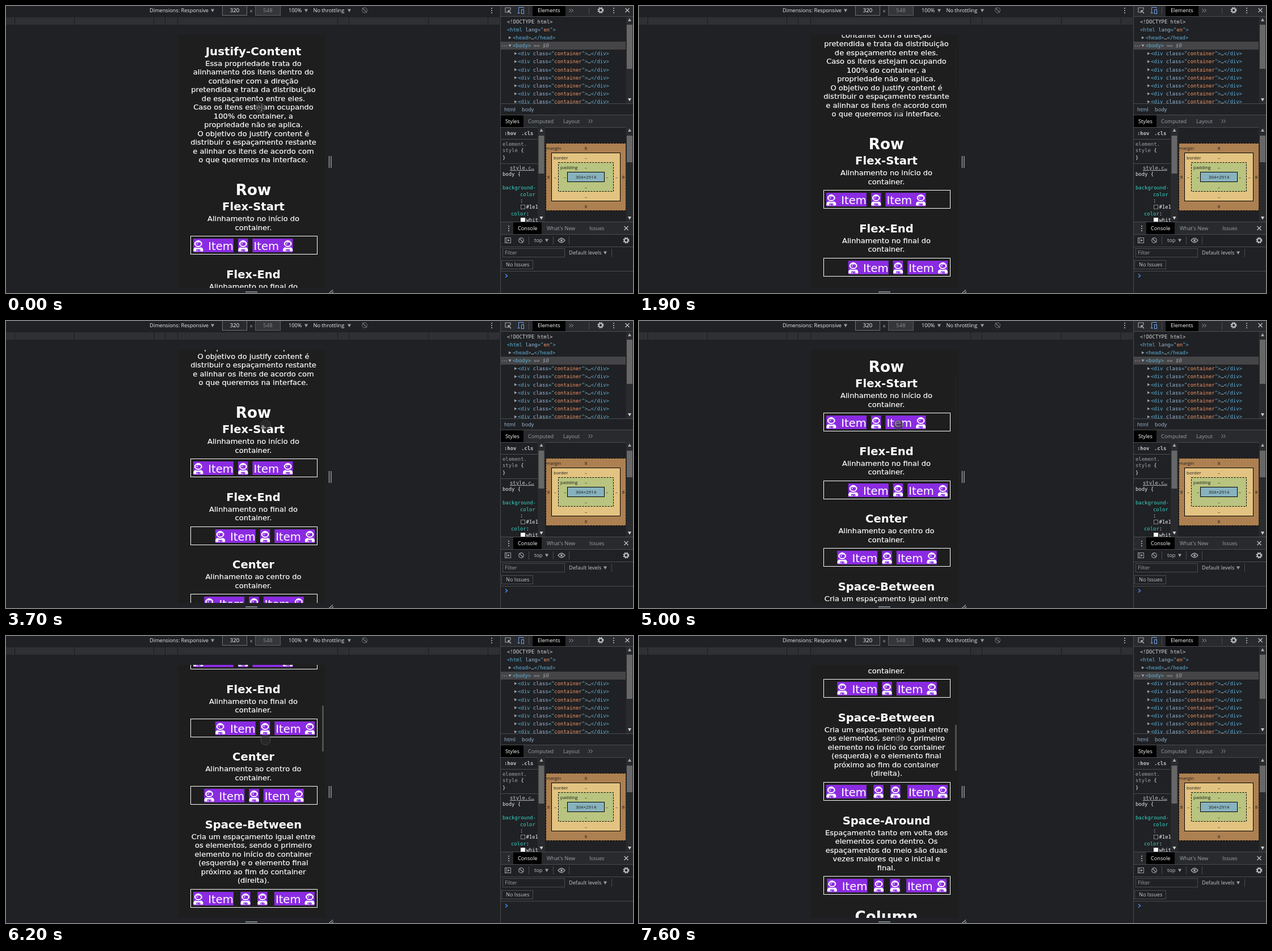
An HTML page that plays this animation: 1105x507 px, repeating every 8000 ms.

```html
<!DOCTYPE html>
<html lang="pt">
<head>
<meta charset="utf-8">
<title>Justify-Content</title>
<style>
  html, body { margin: 0; width: 100%; height: 100%; overflow: hidden; background: #202124; }
  svg { display: block; }
  .page { font-family: "DejaVu Sans", sans-serif; }
  .ui { font-family: "Open Sans", sans-serif; }
  .mono { font-family: "DejaVu Sans Mono", monospace; }
</style>
</head>
<body>
<svg id="stage" width="1105" height="507" viewBox="0 0 1105 507"></svg>
<script>
const LOOP = 8000, NOTCH = 81.3, LINE = 15.5, CENTER = 436;
const PURPLE = '#8a2be2', GREY = '#9aa0a6', EDGE = '#494c50', PALE = '#c4c7cb';

// Drawing helpers; text is placed by the middle of its capitals, on a whole-pixel baseline
const esc = s => s.replace(/&/g, '&amp;').replace(/</g, '&lt;');
const rect = (x, y, w, h, fill, more = '') =>
  `<rect x="${x}" y="${y}" width="${w}" height="${h}" fill="${fill}" ${more}/>`;
const frame = (x, y, w, h, stroke, fill = 'none', more = '') =>
  rect(x + .5, y + .5, w - 1, h - 1, fill, `stroke="${stroke}" ${more}`);
const circle = (x, y, r, fill, more = '') => `<circle cx="${x}" cy="${y}" r="${r}" fill="${fill}" ${more}/>`;
const path = (d, stroke, more = '') => `<path d="${d}" fill="none" stroke="${stroke}" ${more}/>`;
const text = (x, y, s, size, fill, kind, more = '') =>
  `<text class="${kind}" x="${x}" y="${Math.round(y + size * .365)}" font-size="${size}" fill="${fill}" ${more}>${s}</text>`;
const ui = (x, y, s, fill = PALE, size = 9.2, more = '') => text(x, y, esc(s), size, fill, 'ui', more);
const mono = (x, y, s, fill = '#e8eaed', more = '') => text(x, y, esc(s), 8.92, fill, 'mono', more);
const clip = (x, y, w, h, body) =>
  `<svg x="${x}" y="${y}" width="${w}" height="${h}" viewBox="${x} ${y} ${w} ${h}">${body}</svg>`;
const hLine = (y, x = 872, w = 233) => rect(x, y, w, 1, EDGE);
const vLine = (x, y, h) => rect(x, y, 1, h, EDGE);
const middle = 'text-anchor="middle"';

// Icons
const triangle = (x, y, turn = 0, r = 3, fill = GREY) =>
  `<path d="M${-r} ${-r * .8}H${r}L0 ${r}Z" fill="${fill}" transform="translate(${x} ${y}) rotate(${turn})"/>`;
const dots = (x, y) => [-4, 0, 4].map(d => circle(x, y + d, 1, PALE)).join('');
const cross = (x, y) => path(`M${x - 3.5} ${y - 3.5}l7 7m0 -7l-7 7`, PALE, 'stroke-width="1.2"');
const gear = (x, y) => circle(x, y, 4.5, 'none', `stroke="${PALE}" stroke-width="2" stroke-dasharray="2.2 1.33"`)
  + circle(x, y, 3, 'none', `stroke="${PALE}" stroke-width="1.6"`);
const ban = (x, y) => circle(x, y, 4.3, 'none', `stroke="${GREY}" stroke-width="1.2"`)
  + path(`M${x - 3} ${y - 3}l6 6`, GREY, 'stroke-width="1.2"');
const chevrons = (x, y) => path(`M${x - 3.5} ${y - 3}l3 3l-3 3m4 -6l3 3l-3 3`, GREY);

const astronaut = (x, y) => `<g transform="translate(${x} ${y}) scale(.0385)" fill="#fff">
  <path d="M0 512V454A134 134 0 0 1 120 321H328A134 134 0 0 1 448 454V464A48 48 0 0 1 400 512H48A48 48 0 0 1 0 464Z"/>
  ${circle(224, 160, 192, PURPLE)}${circle(224, 160, 160, '#fff')}
  ${rect(48, 96, 352, 128, '#fff', 'rx="16"')}
  <path d="M104 136Q104 96 152 96H296Q344 96 344 136V160A96 96 0 0 1 248 256H200A96 96 0 0 1 104 160Z" fill="${PURPLE}"/>
  <path d="M176 208l12-36 36-12-36-12-12-36-12 36-36 12 36 12Z"/>
  <path d="M128 512V448Q128 416 160 416H288Q320 416 320 448V512Z" fill="${PURPLE}"/>
  ${circle(272, 464, 16, '#fff')}${rect(160, 448, 32, 64, '#fff', 'rx="14"')}</g>`;

// Scrolling page
const heading = (y, s, size = 19.6) => text(CENTER, y, s, size, '#fff', 'page', `font-weight="bold" ${middle}`);
const paragraph = (y, lines) => lines.map((s, i) =>
  text(CENTER, y + i * LINE, s, 13.05, '#fff', 'page', `stroke="#fff" stroke-width=".2" ${middle}`)).join('');

function flexBox(y, x, gap, count) {
  let out = frame(325, y, 224, 33, '#fff');
  for (let i = 0; i < count; i++) {
    const first = i === 0, last = i === count - 1, width = first || last ? 71 : 17.5;
    out += rect(x, y + 5, width, 24, PURPLE) + astronaut(last ? x + 53.5 : x + .2, y + 7.8);
    if (first) out += text(x + 70.8, y + 17.8, 'Item', 19.6, '#fff', 'page', 'text-anchor="end"');
    if (last) out += text(x + 2, y + 17.8, 'Item', 19.6, '#fff', 'page');
    x += width + gap;
  }
  return out;
}

const sections = [
  ['Flex-Start', ['Alinhamento no início do', 'container.'], 330, 8, 3],
  ['Flex-End', ['Alinhamento no final do', 'container.'], 368.8, 8, 3],
  ['Center', ['Alinhamento ao centro do', 'container.'], 349.3, 8, 3],
  ['Space-Between', ['Cria um espaçamento igual entre', 'os elementos, sendo o primeiro',
    'elemento no início do container', '(esquerda) e o elemento final',
    'próximo ao fim do container', '(direita).'], 330, 12.3, 4],
  ['Space-Around', ['Espaçamento tanto em volta dos', 'elementos como dentro. Os',
    'espaçamentos do meio são duas', 'vezes maiores que o inicial e', 'final.'], 331.5, 11.2, 4]
];

function pageContent() {
  let out = heading(79.8, 'Justify-Content', 19.9) + paragraph(100.8, [
    'Essa propriedade trata do', 'alinhamento dos itens dentro do', 'container com a direção',
    'pretendida e trata da distribuição', 'de espaçamento entre eles.',
    'Caso os itens estejam ocupando', '100% do container, a', 'propriedade não se aplica.',
    'O objetivo do justify content é', 'distribuir o espaçamento restante',
    'e alinhar os itens de acordo com', 'o que queremos na interface.']) + heading(324.7, 'Row', 26.2);
  let y = 354;
  for (const [title, lines, x, gap, count] of sections) {
    const boxTop = y + 21.4 + lines.length * LINE;
    out += heading(y, title) + paragraph(y + 21.4, lines) + flexBox(Math.floor(boxTop), x, gap, count);
    y = boxTop + 67.2;
  }
  return out + heading(y + 3.5, 'Column', 26.2);
}

// Device toolbar, ruler and resize handles
function deviceToolbar() {
  const ticks = [15, 120, 260, 280, 302, 584, 604, 744, 849];
  return ui(253, 7.7, 'Dimensions: Responsive', '#e8eaed') + triangle(364, 8)
    + frame(381, -1, 44, 18, '#6b7076', '#292a2d') + ui(403, 7.7, '320', '#fff', 9.6, middle)
    + ui(432, 9, '×', GREY, 10, middle)
    + frame(439, -1, 45, 18, '#5a5d61', '#35363a') + ui(461.5, 7.7, '548', '#85888c', 9.6, middle)
    + ui(498, 7.7, '100%', '#e8eaed') + triangle(529, 8)
    + ui(541.5, 7.7, 'No throttling', '#e8eaed') + triangle(605, 8)
    + circle(632, 7.5, 4.5, 'none', 'stroke="#72767b"') + path('M628 3.5l8 8', '#72767b', 'stroke-width="1.5"')
    + dots(856, 8) + rect(0, 20, 870, 13, '#2f3033') + ticks.map(x => rect(x, 20, 1, 13, '#1b1c1e')).join('')
    + path('M569.5 265v21M573 265v21', GREY, 'stroke-width="1.4"')
    + path('M422 505h21', GREY, 'stroke-width="1.5"')
    + path('M568.5 508l7.5-6.5M573 508l4-3.5', GREY, 'stroke-width="1.3"');
}

// Inspector
const scrollBar = (x, top, bottom, thumbTop, thumbHeight) =>
  rect(x, top, 13, bottom - top, '#2a2b2d') + rect(x + 1.5, thumbTop, 10, thumbHeight, '#676767')
  + triangle(x + 6.5, top + 5.5, 180, 3, '#a8a8a8') + triangle(x + 6.5, bottom - 6.5, 0, 3, '#d0d0d0');

const TAG = '#5db0d7', ATTR = '#9bbbdc', VALUE = '#f29766';
const markup = (x, y, ...parts) => `<text class="mono" x="${x}" y="${Math.round(y + 3.2)}" font-size="8.92">`
  + parts.map(([fill, s]) => `<tspan fill="${fill}">${esc(s)}</tspan>`).join('') + '</text>';

function elementTree() {
  let out = rect(872, 63, 220, 14, '#454547') + mono(883, 28, '<!DOCTYPE html>', '#d0d2d5')
    + markup(883, 42, [TAG, '<html '], [ATTR, 'lang'], [TAG, '="'], [VALUE, 'en'], [TAG, '">'])
    + triangle(888, 56, -90, 2.6) + markup(893, 56, [TAG, '<head>'], [PALE, '…'], [TAG, '</head>'])
    + [875, 878.5, 882].map(x => circle(x, 70.5, .8, GREY)).join('')
    + triangle(888, 70, 0, 2.6) + mono(893, 70, '<body>', TAG) + mono(930, 70, '== $0', GREY, 'font-style="italic"');
  for (let i = 0; i < 7; i++) {
    const y = 84 + i * 14.2;
    out += triangle(898, y, -90, 2.6) + markup(902, y, [TAG, '<div '], [ATTR, 'class'], [TAG, '="'],
      [VALUE, 'container'], [TAG, '">'], [PALE, '…'], [TAG, '</div>']);
  }
  return clip(872, 19, 220, 153, out) + scrollBar(1092.5, 19, 172, 33, 78);
}

function stylesPane() {
  const teal = '#35d4c7';
  return clip(872, 215, 65, 166,
    mono(878, 225, ':hov', PALE, 'font-weight="bold"') + mono(908, 225, '.cls', PALE, 'font-weight="bold"') + hLine(235)
    + mono(875, 244, 'element.', GREY) + markup(875, 255, [GREY, 'style '], ['#e8eaed', '{']) + mono(875, 268, '}') + hLine(278)
    + mono(888, 286, 'style.c…', PALE, 'text-decoration="underline"') + mono(875, 297, 'body {')
    + mono(875, 321, 'background-', teal) + mono(906, 333, 'color', teal) + mono(906, 344, ':')
    + frame(907, 351, 8, 8, '#85888c', '#1e1e1e') + mono(916.5, 355, '#1e1e1e')
    + markup(890, 367, [teal, 'color'], ['#e8eaed', ':'])
    + rect(907, 374, 8, 8, '#fff') + mono(916.5, 378, 'white'))
    + scrollBar(937, 214, 381, 229, 67);
}

function boxModel() {
  const dashed = 'stroke-dasharray="3 2"', ink = '#1c1c1c';
  const layers = [
    [951, 242, 142, 120, '#ad8051', dashed, 'margin', '8', 5, 1],
    [961, 259, 122, 86, '#e3c381', '', 'border', '–', 7, 4],
    [973, 276, 98, 52, '#b8c47f', dashed, 'padding', '–', 12, 4]
  ];
  const label = (x, y, s) => ui(x, y, s, ink, 8, middle);
  return layers.map(([x, y, w, h, fill, dash, name, value, side, inset]) =>
    frame(x, y, w, h, '#000', fill, dash) + ui(x + inset, y + 9, name, ink, 8)
    + label(1022, y + 9, value) + label(1022, y + h - 8, value)
    + label(x + side, 302, value) + label(x + w - side, 302, value)).join('')
    + frame(989, 293, 66, 18, '#000', '#88b2bd') + label(1022, 302, '304×2914')
    + scrollBar(1092.5, 214, 381, 229, 47);
}

function consoleDrawer() {
  return rect(872, 382, 233, 21, '#292a2d') + hLine(381) + hLine(403) + dots(886, 393)
    + rect(894, 382, 50, 21, '#000') + ui(902, 393, 'Console', '#fff')
    + ui(953, 393, "What's New", GREY) + ui(1028, 393, 'Issues', GREY) + cross(1093, 392.5)
    + frame(879, 409, 11, 10, GREY) + path('M882 409v10', GREY)
    + triangle(886, 414, -90, 2.2) + ban(908, 414) + vLine(921, 407, 14)
    + ui(931, 414, 'top') + triangle(953, 414) + vLine(964, 407, 14)
    + path('M973 414Q979 406.5 985 414Q979 421.5 973 414Z', GREY, 'stroke-width="1.3"') + circle(979, 414, 2, GREY)
    + vLine(992, 407, 14) + gear(1093, 414) + hLine(425)
    + frame(875, 428, 110, 16, EDGE) + ui(879, 436, 'Filter', GREY)
    + ui(992, 436, 'Default levels') + triangle(1056, 436) + vLine(1067, 429, 14)
    + frame(873, 449, 56, 16, EDGE) + ui(881, 457, 'No Issues') + hLine(468)
    + path('M880 473.5l3.5 3l-3.5 3', '#4a8af4', 'stroke-width="1.5"');
}

function inspector() {
  const blue = '#6fa4ef';
  return rect(871, 0, 234, 507, '#202124') + rect(872, 0, 233, 18, '#292a2d') + hLine(18)
    + path('M884 11h-4v-8h9v4', GREY, 'stroke-width="1.2"') + path('M890 13l-5-5m0 4v-4h4', PALE, 'stroke-width="1.2"')
    + path('M906 12.5h-4.5M903.5 12v-9.5h8.5v2', blue) + frame(908, 6, 5, 8, blue)
    + vLine(921, 2, 13) + rect(928, 0, 58, 18, '#000') + ui(937, 8, 'Elements', '#fff')
    + chevrons(996, 8) + vLine(1027, 2, 13) + gear(1048, 7.5) + dots(1071, 8) + cross(1095, 7.5)
    + elementTree() + hLine(172) + ui(878, 183, 'html', ATTR) + ui(909, 183, 'body', ATTR) + hLine(192)
    + rect(872, 193, 233, 21, '#292a2d') + rect(872, 193, 40, 21, '#000')
    + ui(880, 203.5, 'Styles', '#fff') + ui(920, 203.5, 'Computed', GREY) + ui(982, 203.5, 'Layout', GREY)
    + chevrons(1030, 203.5) + hLine(214)
    + stylesPane() + boxModel() + consoleDrawer() + vLine(871, 0, 507);
}

document.getElementById('stage').innerHTML = rect(0, 0, 1105, 507, '#202124') + deviceToolbar()
  + rect(303, 51, 260, 447, '#1e1e1e')
  + clip(303, 51, 260, 447, `<g id="content">${pageContent()}</g>`
    + rect(557, 54, 3, 81, '#505050', 'id="thumb"')
    + circle(0, 0, 8.5, '#323232', 'id="touch" fill-opacity=".55" stroke="#5a5a5a" stroke-opacity=".6"'))
  + inspector();

// Each wheel notch: start time, then progress every 100 ms
const notches = [
  [1300, .06, .72, 1], [3000, .01, .59, 1], [4400, .06, .68, 1], [5400, .06, .68, 1],
  [6100, .06, .68, 1], [6800, .14, .14, .88, 1], [7500, .5, 1]
];
const thumbFades = [[0, 0], [1300, 1], [1900, .06], [3000, 1], [3600, .4], [3700, 0], [4400, 1], [5000, .08], [5400, 1]];

function scrollAt(time) {
  return NOTCH * notches.reduce((sum, [start, ...progress]) => {
    if (time < start) return sum;
    const step = Math.min(Math.floor((time - start) / 100), progress.length - 1);
    return sum + progress[step];
  }, 0);
}

const [content, thumb, touch] = ['content', 'thumb', 'touch'].map(id => document.getElementById(id));
const begin = performance.now();

function draw() {
  const time = Math.max(0, performance.now() - begin) % LOOP, scroll = Math.round(scrollAt(time));
  content.setAttribute('transform', `translate(0 ${-scroll})`);
  thumb.setAttribute('transform', `translate(0 ${Math.round(scroll * .181)})`);
  thumb.setAttribute('opacity', thumbFades.filter(([start]) => start <= time).pop()[1]);
  touch.setAttribute('transform', time < 200 ? 'translate(448 180)' : 'translate(457.5 184)');
  requestAnimationFrame(draw);
}
draw();
</script>
</body>
</html>
```
